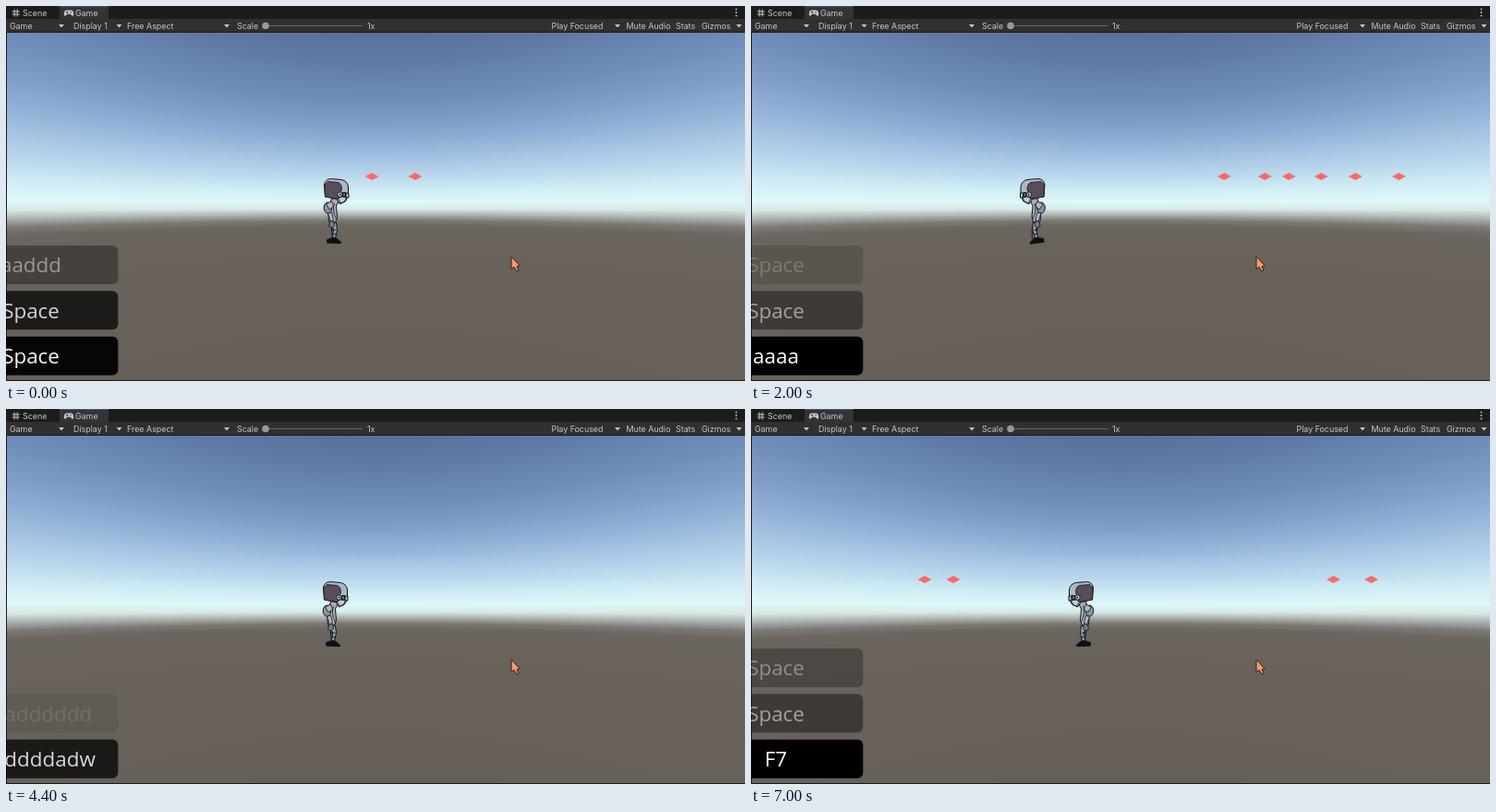
An HTML page with a canvas that plays this animation: 800x407 px, repeating every 7100 ms.

```html
<!DOCTYPE html>
<html lang="en">
<head>
<meta charset="utf-8">
<title>Game view</title>
<style>
  html, body { margin: 0; width: 100%; height: 100%; overflow: hidden; background: #1c1c1c; }
  canvas, svg { position: absolute; left: 0; top: 0; display: block; }
  canvas { top: 29px; }
  .ui { font: 8.9px Inter, "Open Sans", sans-serif; fill: #c6c6c6; }
  .key { font: 22.4px "Open Sans", "Noto Sans", sans-serif; fill: #fff; text-anchor: middle; }
  .ink { stroke: #14151a; stroke-width: 1; stroke-linejoin: round; }
</style>
</head>
<body>
<canvas id="sky" width="800" height="378"></canvas>
<svg width="800" height="407" viewBox="0 0 800 407">
  <path d="M.5 29V407M0 406.5H800" stroke="#1b1b1b"/>

  <g class="ui">
    <rect width="800" height="14" fill="#1c1c1c"/>
    <rect x="58" width="53" height="14" fill="#343434"/>
    <rect x="58" width="53" height="1" fill="#2c5d87"/>
    <rect y="14" width="800" height="14" fill="#303030"/>
    <rect y="28" width="800" height="1" fill="#191919"/>
    <path d="M9.2 3.5V11.5M12.2 3.5V11.5M6.7 6H14.7M6.7 9H14.7" stroke="#c6c6c6" fill="none"/>
    <path d="M65.5 4.5h5q2 0 2.6 3.2q.5 3-1 3q-1 0-2.3-2h-3.6q-1.3 2-2.3 2q-1.5 0-1-3q.6-3.2 2.6-3.2z"/>
    <path d="M65 6.8h2.4M66.2 5.6V8M69.4 6.8h1.6" stroke="#343434" stroke-width=".8"/>
    <g id="bar"></g>
    <path d="M281 21.5H386" stroke="#686868"/>
    <circle cx="281" cy="21.5" r="3.8" fill="#999"/>
    <circle cx="790.5" cy="3.5" r=".9"/><circle cx="790.5" cy="7" r=".9"/><circle cx="790.5" cy="10.5" r=".9"/>
  </g>

  <g id="hero">
    <g class="ink">
      <path id="legA" d="M-6 234L-1 234L0 243L-1 252L-4 252L-5 243Z" fill="#717983"/>
      <g id="legB">
        <path d="M-5 235L0 235L1 243L-1 252L-4 252L-3 244Z" fill="#9aa4ae"/>
        <path d="M-5 243L0 243M-3 248L0 247" fill="none"/>
        <path d="M-10 253.5L-4 251.5L0 252L5 256V257.5L-10 257Z" fill="#101114"/>
      </g>
      <path d="M-5 209L2 209L2 213L0 217L1 229L-1 235L-8 234L-9 221Z" fill="#a5aeb8"/>
      <path d="M-2 214Q-5 222 0 231" fill="none" stroke-width=".8"/>
      <ellipse cx="-9" cy="219" rx="4.3" ry="6" fill="#8992a0"/>
      <path d="M-11 215L-5 212L-3 217L-7 221Z" fill="#aeb7c2" stroke-width=".8"/>
      <path d="M-9 225L-5 224L-3 232L-6 234Z" fill="#b0b9c3" stroke-width=".8"/>
      <path d="M-7 234L-3 233L-2 238L-4 241L-8 239Z" fill="#6f7b89" stroke-width=".8"/>
      <path d="M-13 194Q-12 188-6 187.5L6 188.5Q12 190 13 196V206L10 212L4 215L0 209L-12 207Z" fill="#acb7c5"/>
      <path d="M-12.5 194L-9 190.5L2 191.5Q6 193 6 199L2 209.5L-12 207Z" fill="#574d5b" stroke-width=".8"/>
      <path d="M6 207L11 208L9 212L5 214L2 209Z" fill="#c3ccd5" stroke-width=".8"/>
      <circle cx="4" cy="204.5" r="2.7" fill="#c6ced8"/>
      <circle cx="4.3" cy="204.5" r=".9" stroke="none"/>
      <path d="M7 202.5H10V207H7Z" fill="#5c6470"/>
      <path d="M10.5 203H13.5V208H10.5Z" fill="#9ebfd4"/>
    </g>
  </g>

  <g id="shots" fill="#fb6a68"></g>
  <path d="M547 272V285.5L550 283.2L553 288L555 287L553 282.5L556.3 282Z" fill="#f49b6c" stroke="#2a211d" stroke-width="1" stroke-linejoin="round"/>
  <g id="keys"></g>
</svg>

<script>
const LOOP = 7100, FADE = 1500, ROW = 49.4;
const $ = id => document.getElementById(id);

function add(parent, tag, attrs, text) {
  const el = document.createElementNS('http://www.w3.org/2000/svg', tag);
  for (const k in attrs) el.setAttribute(k, attrs[k]);
  if (text) el.textContent = text;
  return parent.appendChild(el);
}

// linear interpolation through [position, value] points
function track(pts, t) {
  if (t <= pts[0][0]) return pts[0][1];
  for (let i = 1; i < pts.length; i++) {
    const [a, va] = pts[i - 1], [b, vb] = pts[i];
    if (t <= b) return va + (vb - va) * (t - a) / (b - a);
  }
  return pts[pts.length - 1][1];
}

// sky: colour depends on the elevation of the view ray (60 degree camera)
function paintSky() {
  const stops = [
    [29, 0x59709a], [60, 0x607aa5], [100, 0x6f8cb9], [130, 0x819fca], [150, 0x94b2d7],
    [170, 0xaac7e5], [185, 0xbbd8ed], [200, 0xd0ecf5], [213, 0xdff8f8], [220, 0xd6e8e6],
    [226, 0xadb3b0], [232, 0x7d7a75], [238, 0x6b665f], [250, 0x69635c], [407, 0x655f58]
  ];
  const rgb = [16, 8, 0].map(s => stops.map(([y, c]) => [y, c >> s & 255]));
  const table = Array.from({ length: 408 * 4 }, (_, i) => rgb.map(c => track(c, i / 4)));
  const ctx = $('sky').getContext('2d'), img = ctx.createImageData(800, 378);
  for (let y = 0, p = 0; y < 378; y++) {
    for (let x = 0; x < 800; x++, p += 4) {
      const level = 218 + (y - 189) * 327 / Math.hypot(x - 400, 327);
      img.data.set([...table[Math.round(level * 4)], 255], p);
    }
  }
  ctx.putImageData(img, 0, 0);
}

function buildBar() {
  const bar = $('bar');
  [['Scene', 18, 11], ['Game', 75, 11], ['Game', 4], ['Display 1', 73], ['Free Aspect', 131],
   ['Scale', 250], ['1x', 391], ['Play Focused', 590.5], ['Mute Audio', 671.5],
   ['Stats', 725], ['Gizmos', 753]]
    .forEach(([s, x, y = 24.7]) => add(bar, 'text', { x, y }, s));
  for (const x of [60, 122.5, 239, 662, 793.5])
    add(bar, 'path', { d: `M${x - 3} 20h6l-3 3.4z` });
}

const walk = [[1300, 0], [2100, -60], [2500, -60], [2700, -45], [3600, 14], [3700, 14],
  [3900, -8], [4000, -1], [4500, -1], [4700, 15], [5500, 15], [5700, 0]];
const turns = [[0, 1], [1300, -1], [2500, 1], [3700, -1], [3900, 1], [5500, -1]];

// distance flown by any shot since the loop began
const flight = [[100, 0], [900, 117], [1400, 178], [2700, 352], [4900, 646],
  [5400, 714], [6100, 809.5], [7000, 922.5]];

// [fired at, offset, direction]
const shots = [[0, 396, 1], [0, 443, 1], [300, 359, 1], [500, 324, 1], [700, 298, 1],
  [1000, 254, 1], [4900, -251, 1], [5200, -292, 1], [5900, 1110.5, -1], [6100, 1141.5, -1]]
  .map(([at, x, dir]) => ({
    at, x, dir, el: add($('shots'), 'path', { d: 'M-7.5 185L0 181L7.5 185L0 189Z' })
  }));

const every = (from, n) => Array.from({ length: n }, (_, i) => from + i * 100);

// [text, press times]; a single press shows the whole text
const labels = [
  ['aaddd', [-1000]], ['Space', [-430]], ['Space', [-100]],
  ['Space', [300]], ['Space', [500]], ['Space', [700]], ['Space', [1100]],
  ['aaaadddddd', [1400, 1600, 1800, 2000, ...every(2500, 6)]],
  ['dddddddadw', every(3100, 10)],
  ['d', [4500]], ['Space', [4900]], ['Space', [5200]], ['a', [5500]],
  ['Space', [5900]], ['Space', [6100]], ['F7', [7000]]
].map(([text, times]) => {
  const g = add($('keys'), 'g', {});
  add(g, 'rect', { x: -67, y: 358.7, width: 188.3, height: 42, rx: 6 });
  return { text, times, g, word: add(g, 'text', { class: 'key', x: 27, y: 388 }) };
});

function drawLabels(t) {
  let row = 0;
  for (let i = labels.length - 1; i >= 0; i--) {
    const { text, times, g, word } = labels[i];
    const done = times.filter(p => p <= t);
    const alpha = done.length ? 1 - (t - done[done.length - 1]) / FADE : 0;
    g.setAttribute('opacity', Math.max(0, alpha));
    if (!done.length) continue;
    word.textContent = times.length > 1 ? text.slice(0, done.length) : text;
    g.setAttribute('transform', `translate(0 ${-ROW * row++})`);
  }
}

function drawHero(t) {
  const x = track(walk, t), dir = turns.filter(k => k[0] <= t).pop()[1];
  const moving = Math.abs(track(walk, t + 50) - track(walk, t - 50)) > 1;
  const swing = moving ? 7 * Math.sin(t / 95) : 0;
  $('hero').setAttribute('transform', `translate(${357.5 + x} 0) scale(${dir} 1)`);
  $('legA').setAttribute('transform', `rotate(${-swing} -3 235)`);
  $('legB').setAttribute('transform', `rotate(${swing} -3 235)`);
}

function drawShots(t) {
  const d = track(flight, t);
  for (const s of shots) {
    const x = s.x + s.dir * d;
    s.el.setAttribute('visibility', t >= s.at && x < 792 ? 'visible' : 'hidden');
    s.el.setAttribute('transform', `translate(${x} 0)`);
  }
}

function draw(now) {
  let t = Math.floor((now % LOOP) / 100) * 100;
  if (t < 200) t = 0; // the opening picture holds for two ticks
  drawHero(t);
  drawShots(t);
  drawLabels(t);
}

paintSky();
buildBar();
const start = performance.now();
draw(0);
requestAnimationFrame(function tick() {
  draw(performance.now() - start);
  requestAnimationFrame(tick);
});
</script>
</body>
</html>
```
